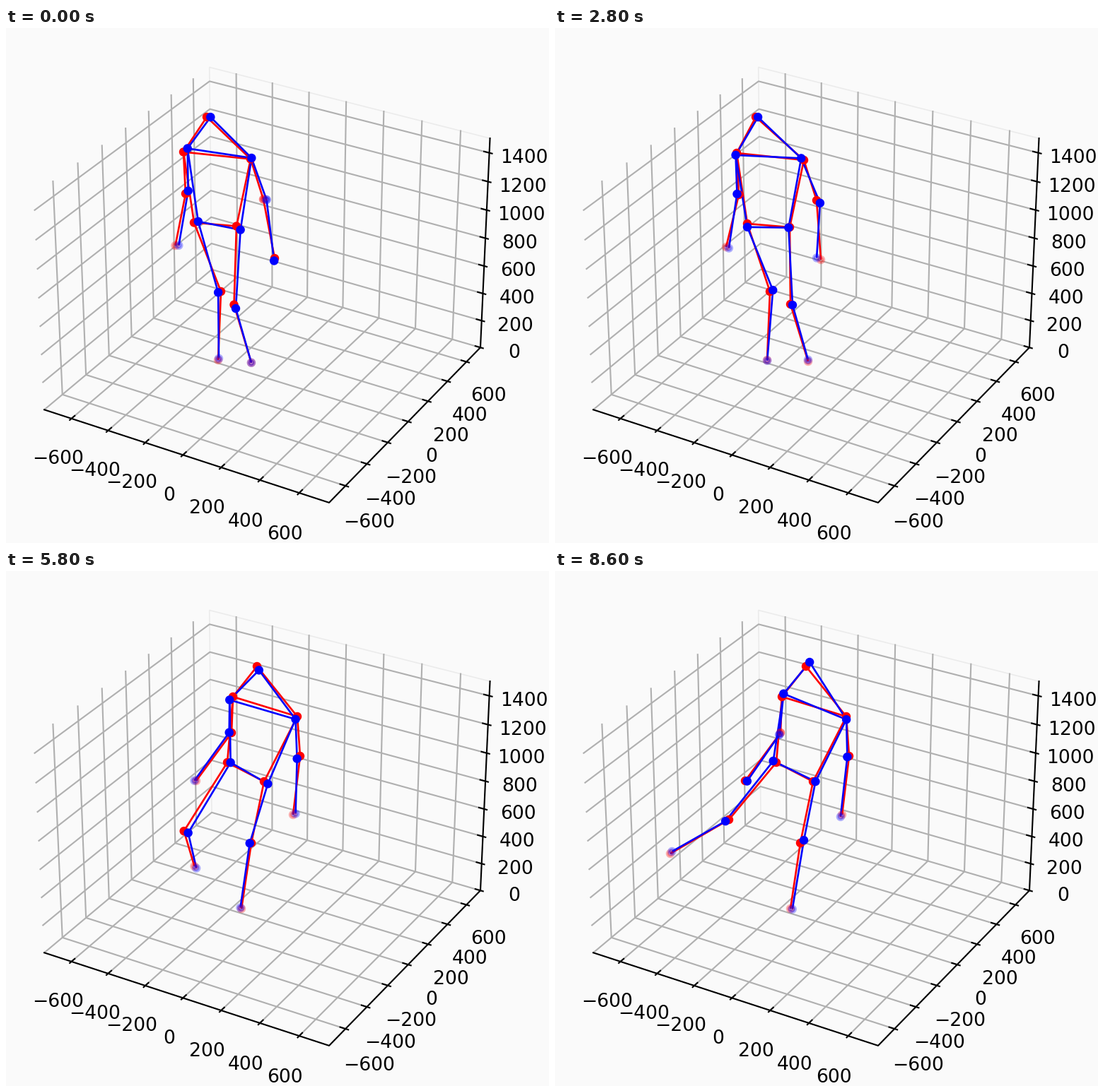
Write a matplotlib script that moves like this. It is 768 by 729 pixels and loops after 8800 ms.

```python
import numpy as np
import matplotlib.pyplot as plt
from matplotlib.animation import FuncAnimation
from matplotlib.collections import LineCollection

W, H, DPI = 768, 729, 192
FRAMES, INTERVAL = 44, 200
BACKGROUND, GRID, PANE = "#fafafa", "#b0b0b0", "#ebebeb"
RED, BLUE = (1, 0, 0), (0, 0, 1)

plt.rcParams["font.family"] = "DejaVu Sans"
fig = plt.figure(figsize=(W / DPI, H / DPI), dpi=DPI, facecolor=BACKGROUND)
ax = fig.add_axes([0, 0, 1, 1])
ax.set_xlim(0, W)
ax.set_ylim(H, 0)
ax.axis("off")


# ---- the box: perspective camera at elevation 30, azimuth -60 ----
LIM, TOP = 750, 1500
HALF = np.array([0.5952, 0.5952, 0.4464])
RIGHT = np.array([0.8660, 0.5, 0])
UP = np.array([-0.25, 0.4330, 0.8660])
TOWARD = np.array([0.4330, -0.75, 0.5])
SCALE, DISTANCE = 387.65, 10
CENTER = SCALE * np.array([0.95, 0.9])


def project(point, offset=(0, 0)):
    """Pixel place of a 3D point, moved by an offset that shrinks with depth."""
    x, y, z = point
    p = np.array([x / LIM, y / LIM, 2 * z / TOP - 1]) * HALF
    zoom = 1 / (1 - p @ TOWARD / DISTANCE)
    flat = SCALE * np.array([p @ RIGHT, -(p @ UP)])
    return CENTER + zoom * (flat + np.array(offset))


def path(*points, color=GRID, width=0.8, order=1):
    xy = np.array([project(p) for p in points])
    ax.plot(xy[:, 0], xy[:, 1], color=color, lw=width, zorder=order)


def tick(point, axis, side, value, offset):
    """Short mark across an axis edge with its number beside it."""
    step = np.eye(3)[axis] * side
    path(point + 14 * step, point - 27 * step, color="black", order=3)
    x, y = project(point, offset)
    label = str(value).replace("-", "\u2212")
    ax.text(x, y + 9.7, label, fontsize=10, ha="center", va="baseline")


def draw_box():
    path((-LIM, LIM, 0), (-LIM, LIM, TOP), (LIM, LIM, TOP),
         color=PANE, width=0.6, order=0)
    for v in range(-600, 601, 200):
        path((v, -LIM, 0), (v, LIM, 0), (v, LIM, TOP))
        path((LIM, v, 0), (-LIM, v, 0), (-LIM, v, TOP))
        tick(np.array([v, -LIM, 0]), 1, -1, v, (-19, 54))
        tick(np.array([LIM, v, 0]), 0, 1, v, (32.4, 47.2))
    for v in range(0, 1401, 200):
        path((-LIM, -LIM, v), (-LIM, LIM, v), (LIM, LIM, v))
        tick(np.array([LIM, LIM, v]), 0, 1, v, (49.5, 5))
    path((-LIM, -LIM, 0), (LIM, -LIM, 0), (LIM, LIM, 0), (LIM, LIM, TOP),
         color="black", order=2)


# ---- the two figures ----
(HEAD, SHOULDER_L, SHOULDER_R, ELBOW_L, ELBOW_R, WRIST_L, WRIST_R,
 HIP_L, HIP_R, KNEE_L, KNEE_R, ANKLE_L, ANKLE_R) = JOINTS = range(13)
SIDES = [(SHOULDER_L, ELBOW_L, WRIST_L, HIP_L, KNEE_L, ANKLE_L),
         (SHOULDER_R, ELBOW_R, WRIST_R, HIP_R, KNEE_R, ANKLE_R)]
BONES = [(SHOULDER_L, SHOULDER_R), (HIP_L, HIP_R)]
for shoulder, elbow, wrist, hip, knee, ankle in SIDES:
    BONES += [(HEAD, shoulder), (shoulder, elbow), (elbow, wrist),
              (shoulder, hip), (hip, knee), (knee, ankle)]

# Standing on both feet, before and after turning round.
FACING = np.array([
    (284, 126), (257, 177), (352, 187), (260, 236), (370, 244), (242, 310),
    (376, 328), (272, 277), (332, 282), (304, 373), (333, 391), (300, 470),
    (358, 472)])
TURNED = np.array([
    (355, 135), (315, 181), (411, 202), (304, 232), (415, 258), (269, 304),
    (405, 341), (307, 274), (364, 294), (282, 381), (346, 381), (272, 439),
    (333, 478)])


def shifts(*groups):
    """Joint displacements from (dx, dy, joints...) groups."""
    moved = np.zeros((13, 2))
    for dx, dy, *joints in groups:
        moved[joints] = dx, dy
    return moved


# A kick has two parts: lifting the knee as the body sways, and reaching out.
LIFT_RIGHT = shifts(
    (-12, -3, SHOULDER_L, SHOULDER_R, ELBOW_L, ELBOW_R, HIP_L, HIP_R),
    (-5, -4, WRIST_L), (8, -4, WRIST_R), (-15, 0, KNEE_R))
REACH_RIGHT = shifts((25, -6, KNEE_R), (92, -15, ANKLE_R))
LIFT_LEFT = shifts(
    (6, -3, SHOULDER_L, HIP_L), (15, -3, ELBOW_L), (0, -7, WRIST_L),
    (1, 4, SHOULDER_R, ELBOW_R, WRIST_R, HIP_R, KNEE_R),
    (-30, -12, KNEE_L), (0, -20, ANKLE_L))
REACH_LEFT = shifts((-6, -17, KNEE_L), (-109, -19, ANKLE_L))

# time step, lift, reach
KICKS_RIGHT = [(0, 0.5, -0.12), (3, 1, 1.25), (5, 0, 0), (10, 1, 1.45),
               (14, 0, 0), (18, 1, 1.24), (20, 1, 1)]
KICKS_LEFT = [(25, 1, 0.87), (29, 1, 0.05), (33, 1, 1.3), (39, 0, 0),
              (42, 1, 1.12), (43, 1, 1)]
KEYS = KICKS_RIGHT + KICKS_LEFT
TIMES = [step for step, *_ in KEYS]
POSES = np.array(
    [FACING + lift * LIFT_RIGHT + reach * REACH_RIGHT
     for _, lift, reach in KICKS_RIGHT]
    + [TURNED + lift * LIFT_LEFT + reach * REACH_LEFT
       for _, lift, reach in KICKS_LEFT])

# The blue figure strays a little from the red one, least at the feet.
stray = np.random.default_rng(4).uniform(-6, 6, POSES.shape)
stray[:, [ANKLE_L, ANKLE_R]] *= 0.5


def state(frame):
    """Joints of both figures and the dot opacities at a time step."""
    k = min(np.searchsorted(TIMES, frame, side="right"), len(TIMES) - 1)
    t = (frame - TIMES[k - 1]) / (TIMES[k] - TIMES[k - 1])
    ease = t * t * (3 - 2 * t)
    red, drift = (a[k - 1] + (a[k] - a[k - 1]) * ease for a in (POSES, stray))

    alpha = np.ones(13)
    alpha[[WRIST_L, WRIST_R, ANKLE_L, ANKLE_R]] = 0.3
    nearest = k if t > 0.5 else k - 1
    if abs(KEYS[nearest][2]) > 0.1:  # the arm beside the kick swings forward
        _, elbow, wrist, *_ = SIDES[nearest < len(KICKS_RIGHT)]
        alpha[elbow], alpha[wrist] = 0.51, 1
    return (red, red + drift), alpha


draw_box()
limbs = [LineCollection([], colors=[color], linewidths=1, zorder=4 + i)
         for i, color in enumerate((RED, BLUE))]
for limb in limbs:
    ax.add_collection(limb)
dots = ax.scatter(np.zeros(26), np.zeros(26), s=10, linewidths=1.5, zorder=6)


def draw(frame):
    bodies, alpha = state(frame)
    for limb, body in zip(limbs, bodies):
        limb.set_segments([body[list(bone)] for bone in BONES])
    colors = [color + (alpha[j],) for color in (RED, BLUE) for j in JOINTS]
    dots.set_offsets(np.concatenate(bodies))
    dots.set_facecolors(colors)
    dots.set_edgecolors(colors)
    return [*limbs, dots]


animation = FuncAnimation(fig, draw, frames=FRAMES, interval=INTERVAL,
                          repeat=True, repeat_delay=0)
plt.show()
```
